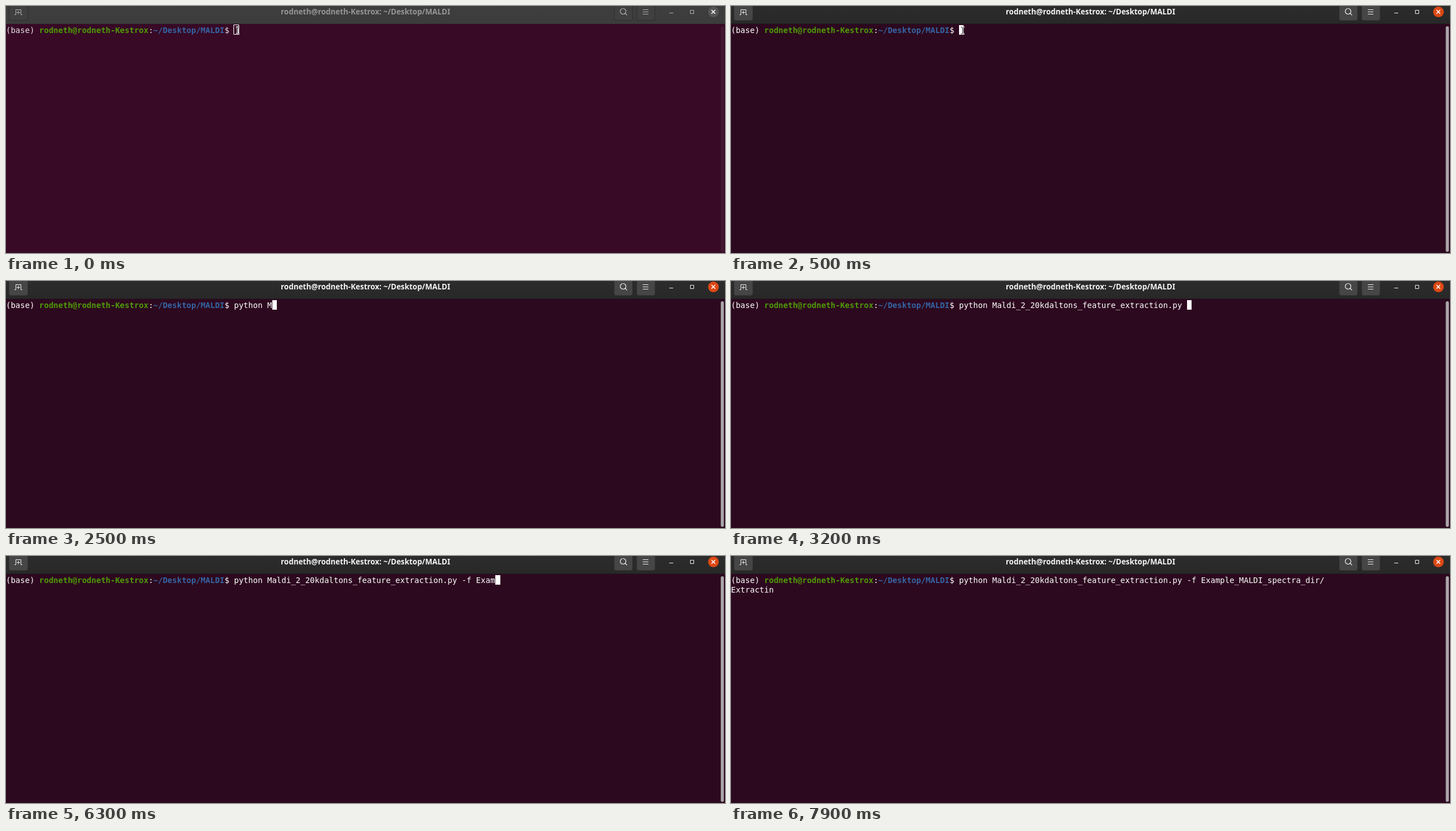
An HTML page with a canvas for the animation above (8 s loop, 1277 px wide and 439 px high).

```html
<!DOCTYPE html>
<html lang="en">
<head>
<meta charset="utf-8">
<title>Terminal</title>
<style>
  html, body { margin: 0; width: 100%; height: 100%; overflow: hidden; background: #2d091f; }
  canvas { display: block; }
</style>
</head>
<body>
<canvas width="1277" height="439"></canvas>
<script>
const ctx = document.querySelector('canvas').getContext('2d');

const LOOP = 8000, CELL = 8.4375, ROW = 17, TOP = 34;
const MONO = '14.015px "DejaVu Sans Mono", monospace';
const HOST = 'rodneth@rodneth-Kestrox', DIR = '~/Desktop/MALDI';
const COMMAND = 'python Maldi_2_20kdaltons_feature_extraction.py -f Example_MALDI_spectra_dir/';
const OUTPUT = 'Extractin';
const PROMPT_COLS = `(base) ${HOST}:${DIR}$ `.length;

// [time, characters shown]
const TYPED = [[0, 0], [900, 1], [1300, 3], [1400, 4], [1600, 5], [1700, 6], [1900, 7],
  [2500, 8], [2600, 9], [2800, 10], [3200, 48], [4800, 50], [5000, 51],
  [5800, 52], [6000, 53], [6200, 54], [6300, 55], [6700, COMMAND.length]];
const PRINTED = [[0, 0], [7600, 2], [7700, 4], [7800, 7], [7900, 9]];

const FOCUSED = {
  back: '#2d091f', bar: ['#2c2c2c', '#282828'], edge: '#1e1e1e', button: '#464646', outline: '#383838',
  title: '#f4f4f4', icon: '#f2f2f2', close: '#dd4814', text: '#ffffff', scroll: '#a9a6a8'
};
const UNFOCUSED = {
  back: '#380a26', bar: ['#3e3e3e', '#3c3c3c'], edge: '#363636', button: '#404040', outline: '#2e2e2e',
  title: '#969696', icon: '#b4b4b4', close: '#555555', text: '#e4e0e3', scroll: '#451832'
};

const valueAt = (steps, t) => steps.findLast(([start]) => start <= t)[1];

function fill(color, x, y, w, h) {
  ctx.fillStyle = color;
  ctx.fillRect(x, y, w, h);
}

function rounded(color, x, y, w, h, r) {
  ctx.fillStyle = color;
  ctx.beginPath();
  ctx.roundRect(x, y, w, h, r);
  ctx.fill();
}

function line(path, color, width = 1) {
  ctx.strokeStyle = color;
  ctx.lineWidth = width;
  ctx.stroke(new Path2D(path));
}

function write(text, col, row, color, bold = false) {
  ctx.font = (bold ? 'bold ' : '') + MONO;
  ctx.fillStyle = color;
  ctx.fillText(text, col * CELL, TOP + row * ROW + 14);
  return col + text.length;
}

function drawButton(x, w, theme) {
  rounded(theme.outline, x, -6, w, 32, 4);
  rounded(theme.button, x + 1, -6, w - 2, 31, 3);
}

function drawTitleBar(theme) {
  const shade = ctx.createLinearGradient(0, 0, 0, 32);
  theme.bar.forEach((color, i) => shade.addColorStop(i, color));
  fill(shade, 0, 0, 1277, 32);
  fill(theme.edge, 0, 31, 1277, 1);
  drawButton(5, 34, theme);
  drawButton(1080, 33, theme);
  drawButton(1120, 33, theme);

  ctx.font = 'bold 13.4px "Noto Sans", sans-serif';
  ctx.textAlign = 'center';
  ctx.fillStyle = theme.title;
  ctx.fillText(`${HOST}: ${DIR}`, 638.5, 15);
  ctx.textAlign = 'left';

  line('M15 15.5h2.5v-9h9v9h2.5M22 8.5v6M19 11.5h6', theme.icon);
  line('M1101 9.5a5 5 0 1 1-10 0a5 5 0 1 1 10 0M1099.7 13l3.3 3.3', theme.icon, 1.2);
  line('M1131 6.5h10M1131 10.5h10M1131 14.5h10', theme.icon, 1.1);
  line('M1178 12.5h7M1215.5 7.5h6v6h-6z', theme.icon);
  rounded(theme.close, 1247, 1, 19, 19, 9.5);
  line('M1253 7l6.6 6.6M1259.6 7l-6.6 6.6', '#ffffff', 1.5);
}

function drawPointer() {
  const beam = 'M408.5 37.5h2l1 1l1-1h2M411.5 38v11M408.5 49.5h2l1-1l1 1h2';
  line(beam, '#ffffff', 3);
  line(beam, '#111111');
}

function drawCursor(col, row, hollow, color) {
  const x = Math.round(col * CELL), y = TOP + row * ROW;
  if (hollow) line(`M${x - 0.5} ${y - 0.5}h9v17h-9z`, color);
  else fill(color, x, y, Math.round((col + 1) * CELL) - x, ROW);
}

function draw(t) {
  const theme = t < 500 ? UNFOCUSED : FOCUSED;
  const typed = valueAt(TYPED, t), printed = valueAt(PRINTED, t);
  const entered = t >= 7400;

  fill(theme.back, 0, 0, 1277, 439);
  drawTitleBar(theme);
  rounded(theme.scroll, 1269.5, 36, 5.5, 401, 2.75);

  let col = write('(base) ', 0, 0, theme.text);
  col = write(HOST, col, 0, '#4e9a06', true);
  col = write(':', col, 0, theme.text);
  col = write(DIR, col, 0, '#3465a4', true);
  col = write('$ ', col, 0, theme.text);
  write(COMMAND.slice(0, typed), col, 0, theme.text);
  write(OUTPUT.slice(0, printed), 0, 1, theme.text);

  const blinkedOff = (t >= 3700 && t < 4300) || t >= 7900;
  if (!blinkedOff) {
    drawCursor(entered ? printed : PROMPT_COLS + typed, entered ? 1 : 0, t < 300, '#ffffff');
  }
  if (t < 1000) drawPointer();
}

function tick() {
  draw(performance.now() % LOOP);
  requestAnimationFrame(tick);
}
tick();
</script>
</body>
</html>
```
